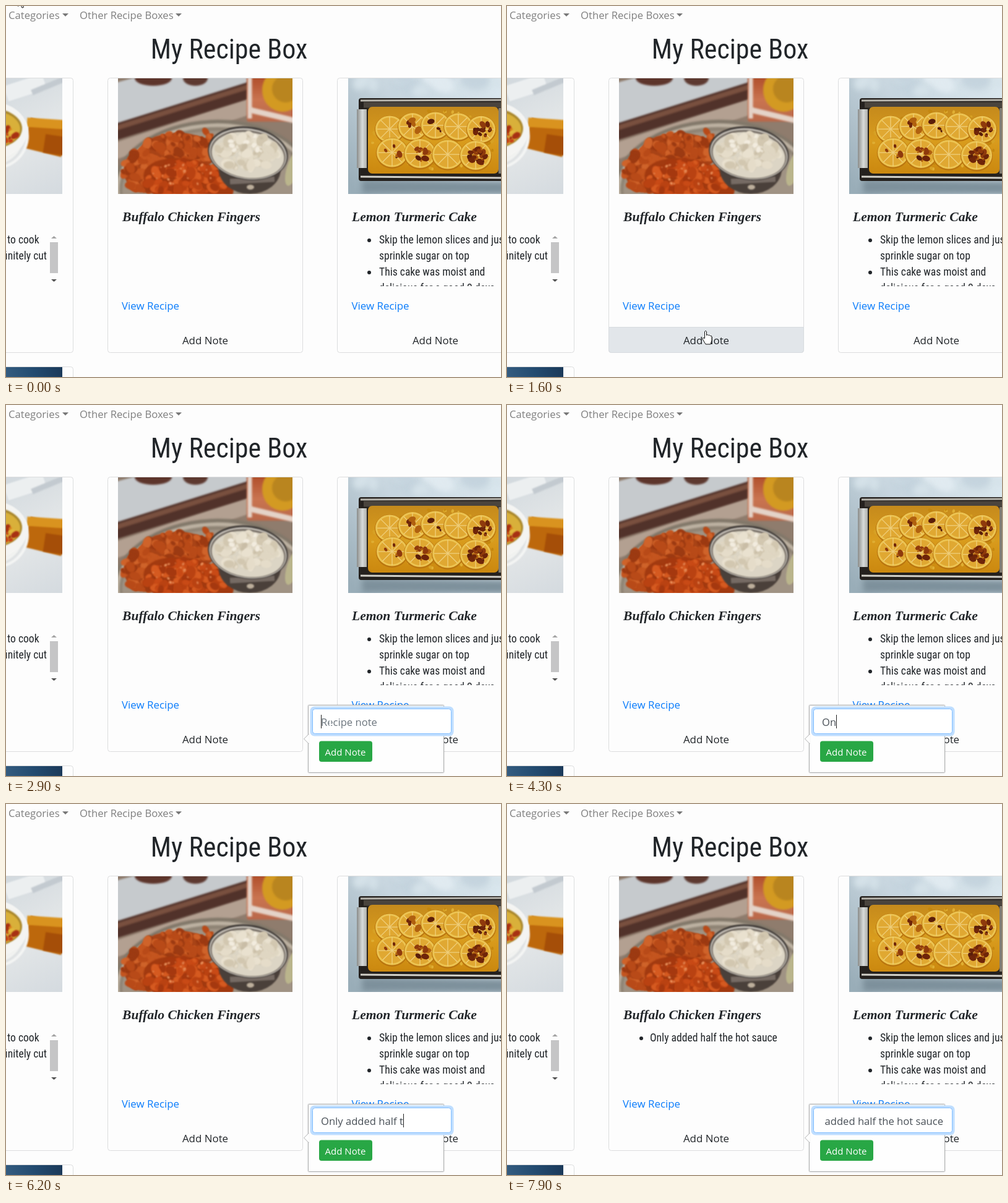
Write an HTML page with a canvas that moves like this. It is 800 by 600 pixels and loops after 8000 ms.

```html
<!DOCTYPE html>
<html lang="en">
<head>
<meta charset="utf-8">
<title>My Recipe Box</title>
<style>
html, body { margin: 0; width: 100%; height: 100%; overflow: hidden; background: #fdfdfd; }
canvas { display: block; }
</style>
</head>
<body>
<canvas id="stage" width="800" height="600"></canvas>
<script>
const stage = document.getElementById('stage');
const LOOP = 8000;
const INK = '#212529', LINK = '#0a7cfb', PAGE = '#fdfdfd', EDGE = '#dcddde';
const SANS = '"Open Sans", "Noto Sans", sans-serif';
const NARROW = '"Roboto Condensed", Roboto, sans-serif';
const SCRIPT = 'Pacifico, "Liberation Serif", serif';
const NOTE = 'Only added half the hot sauce';
let c;

// ---- text and shape helpers ----
function text(s, x, y, font, color, align = 'left') {
  c.font = font;
  c.fillStyle = color;
  c.textAlign = align;
  c.fillText(s, x, y);
}
const sans = (s, x, y, color, align, size = 16.9) => text(s, x, y, `${size}px ${SANS}`, color, align);
const script = (s, x) => text(s, x, 348, `italic bold 21.6px ${SCRIPT}`, INK);
function narrow(s, x, y, size = 17.6, align) {
  c.fontStretch = 'condensed';
  text(s, x, y, `${size}px ${NARROW}`, INK, align);
  c.fontStretch = 'normal';
}
function rect(color, x, y, w, h) {
  c.fillStyle = color;
  c.fillRect(x, y, w, h);
}
function oval(color, x, y, rx, ry = rx, turn = 0) {
  c.fillStyle = color;
  c.beginPath();
  c.ellipse(x, y, rx, ry, turn, 0, 7);
  c.fill();
}
function line(color, width, x0, y0, x1, y1) {
  c.strokeStyle = color;
  c.lineWidth = width;
  c.beginPath();
  c.moveTo(x0, y0);
  c.lineTo(x1, y1);
  c.stroke();
}
function box(x, y, w, h, r, fill, edge) {
  c.beginPath();
  c.roundRect(x, y, w, h, r);
  if (fill) { c.fillStyle = fill; c.fill(); }
  if (edge) { c.strokeStyle = edge; c.lineWidth = 1; c.stroke(); }
}
function triangle(color, x, y, half, h) {
  c.fillStyle = color;
  c.beginPath();
  c.moveTo(x - half, y);
  c.lineTo(x + half, y);
  c.lineTo(x, y + h);
  c.fill();
}
function clipped(x, y, w, h, draw) {
  c.save();
  c.beginPath();
  c.rect(x, y, w, h);
  c.clip();
  draw();
  c.restore();
}
function fade(x0, y0, x1, y1, ...colors) {
  const g = c.createLinearGradient(x0, y0, x1, y1);
  colors.forEach((k, i) => g.addColorStop(i / (colors.length - 1), k));
  return g;
}
function seeded(seed) {
  return () => (seed = (seed * 16807) % 2147483647) / 2147483647;
}
// random blobs inside an ellipse
function scatter(n, x, y, rx, ry, size, ...colors) {
  const rnd = seeded(Math.round(x * 31 + y + n));
  for (let i = 0; i < n; i++) {
    const a = rnd() * 6.283, d = Math.sqrt(rnd()), s = size * (0.4 + rnd());
    oval(colors[Math.floor(rnd() * colors.length)],
      x + Math.cos(a) * d * rx, y + Math.sin(a) * d * ry, s, s * 0.7, rnd() * 3);
  }
}
// nested ellipses, each a little smaller than the last
function rings(x, y, rx, ry, step, turn, ...colors) {
  colors.forEach((k, i) => oval(k, x, y + i, rx - i * step, ry - i * step, turn));
}

// ---- pictures ----
function chicken() {
  rect('#8f7c6d', 181, 117, 282, 187);
  c.filter = 'blur(1.5px)';
  line('#c6cacd', 70, 160, 165, 400, 100);
  oval('#5d352b', 238, 117, 30, 12);
  oval('#5d3930', 306, 117, 20, 12);
  line('#b3a091', 26, 176, 235, 400, 160);
  line('#51322a', 26, 176, 204, 400, 134);
  line('#79503f', 8, 176, 198, 400, 128);
  rings(335, 290, 162, 106, 5, -0.05, '#82786a', '#bdb2a2', '#8f8475', '#a09384');
  box(389, 105, 80, 82, 4, fade(0, 117, 0, 187, '#b1502c', '#c97450', '#b9684a'));
  line('#e4d3c8', 7, 394, 112, 394, 182);
  line('#e4d3c8', 9, 394, 168, 470, 186);
  oval('#d39a22', 447, 136, 33, 35);
  oval('#b9851f', 452, 134, 22, 22);

  c.filter = 'blur(1px)';
  const crisp = ['#c4551f', '#b84a18', '#cf632a', '#9c3a12'];
  oval('#a84317', 277, 238, 62, 33);
  scatter(130, 274, 236, 56, 30, 8, ...crisp);
  oval('#a84317', 226, 266, 36, 35);
  scatter(90, 224, 268, 36, 32, 8, ...crisp);
  scatter(16, 322, 214, 14, 12, 6, ...crisp);
  oval('#a23a10', 295, 286, 74, 38, 0.2);
  scatter(130, 294, 282, 66, 30, 8, '#c84a16', '#b94212', '#d55a20', '#a5380f');
  scatter(24, 292, 272, 55, 18, 2, '#e8935f', '#e08350');

  oval('#4a403a', 394, 264, 50, 40);
  line('#766b64', 9, 362, 284, 434, 280);
  rings(391, 238, 65, 43, 2, 0.14, '#3a3532', '#c9c4bc', '#6f675f', '#dcd5c5');
  scatter(90, 389, 236, 48, 28, 8, '#e9e1cf', '#dfd6c2', '#e5dcc9', '#d2c7b0');
  scatter(14, 388, 224, 34, 16, 4, '#f2ecdf', '#c9bda6');
  oval('#bdaf9c', 395, 293, 6, 4);
  oval('#bab58c', 464, 262, 10, 30, 0.3);
  c.filter = 'none';
}

function lemon(x, y, r, burn) {
  oval('#b9750f', x, y + 1, r + 1, r);
  oval('#ecc452', x, y, r, r * 0.94);
  oval('#e0a832', x, y, r - 3, r * 0.94 - 3);
  for (let a = x % 1; a < 6.2; a += 0.785) {
    line('#efcf7d', 1.3, x, y, x + Math.cos(a) * (r - 3), y + Math.sin(a) * (r - 3));
  }
  scatter(burn, x + 2, y, r * 0.6, r * 0.5, 5, '#6f2509', '#8f3a0c', '#5a1e0a', '#b0600f');
}

function cake() {
  rect(fade(790, 117, 570, 304, '#dbe8ef', '#c8d6df', '#99adb8'), 553, 117, 247, 187);
  c.filter = 'blur(5px)';
  scatter(20, 680, 123, 130, 18, 18, '#e0eaf0', '#c5d4de', '#d4e1e8');
  line('#7d909b', 22, 575, 292, 810, 294);
  c.filter = 'blur(0.7px)';
  box(570, 149, 240, 134, 4, '#25211e');
  line('#b9b6ae', 3, 573, 153, 810, 152);
  line('#4a443d', 9, 578, 160, 810, 160);
  rect(fade(567, 0, 585, 0, '#8a8c8a', '#d8dbda', '#a0a09b'), 567, 167, 16, 95);
  line('#d3d1c9', 3, 573, 276, 810, 278);
  rect('#817d72', 796, 165, 4, 106);
  box(585, 163, 211, 108, 7, fade(0, 163, 0, 271, '#c58a1c', '#d99c1d', '#cb880f'));
  scatter(150, 690, 217, 102, 50, 3, '#d6a024', '#c4870f', '#dfae33');
  for (let i = 0; i < 5; i++) lemon(620 + i * 37, 199 - 6 * Math.sin(i * 0.8), 23, [0, 6, 3, 0, 14][i]);
  for (let i = 0; i < 4; i++) lemon(624 + i * 45, 237 + i * 1.5, 25, [5, 14, 0, 22][i]);
  c.filter = 'none';
}

function soup() {
  rect(fade(0, 117, 91, 304, '#d2d9de', '#e4e7e8', '#d4dadf'), 0, 117, 91, 187);
  c.filter = 'blur(1.2px)';
  line('#eceff0', 26, 0, 142, 62, 122);
  line('#c3cad0', 9, 42, 140, 95, 118);
  line('#bd680c', 50, 34, 205, 95, 220);
  line('#d9931f', 15, 34, 188, 95, 192);
  line('#a54e08', 30, 62, 222, 95, 227);
  rings(-19, 210, 56, 54, 5, 0.1, '#f4f5f4', '#dfe2e3', '#f1f2f0');
  oval('#f4f4f2', -25, 202, 60, 46);
  rings(-26, 198, 52, 33, 3, 0, '#a8862c', '#d9b03a');
  scatter(16, 5, 208, 13, 11, 5, '#c43f16', '#dc851d', '#a73113', '#e2b83d');
  c.filter = 'none';
}

// ---- the page ----
function page() {
  rect(PAGE, 0, 0, 800, 600);
  sans('Categories', 4, 21, '#7f7f7f', 'left', 16.7);
  sans('Other Recipe Boxes', 119, 21, '#7f7f7f', 'left', 16.7);
  for (const x of [96, 279]) triangle('#777', x, 12, 5, 5);
  narrow('My Recipe Box', 360.5, 85, 44, 'center');

  for (const x of [-207, 164, 535]) box(x + 0.5, 116.5, 315, 444, 4, PAGE, EDGE);
  clipped(0, 117, 91, 187, soup);
  clipped(181, 117, 282, 187, chicken);
  clipped(553, 117, 247, 187, cake);
  box(-206.5, 583.5, 315, 60, 4, PAGE, EDGE);
  rect(fade(0, 600, 91, 584, '#345c80', '#234b70', '#1b3959'), 0, 584, 91, 16);

  narrow('to cook', 2, 384);
  narrow('definitely cut', 66, 410, 17.6, 'right');
  rect('#c5c5c6', 71, 382, 13, 50);
  triangle('#a3a3a3', 77.5, 376, 4.5, -4);
  triangle('#505050', 77.5, 442, 4.5, 4);

  script('Buffalo Chicken Fingers', 188);
  script('Lemon Turmeric Cake', 559);
  clipped(553, 360, 247, 93, () => {
    ['Skip the lemon slices and just', 'sprinkle sugar on top', 'This cake was moist and', 'delicious for a good 2 days']
      .forEach((s, i) => {
        narrow(s, 603, 384 + i * 26);
        if (i % 2 === 0) oval(INK, 587, 379 + i * 26, 3);
      });
  });
  for (const x of [187, 558.5]) sans('View Recipe', x, 491, LINK);
  sans('Add Note', 694, 547, INK, 'center');
}

function noteButton(t) {
  const hover = t >= 1600 && t < 2500;
  const ring = t >= 1900 && t < 2900;
  if (ring) box(162.5, 516.5, 319, 46, 5, 'rgba(200,205,212,0.55)');
  if (hover) box(164.5, 519.5, 315, 41, [0, 0, 4, 4], '#e2e6ea', '#d7dbdf');
  else if (ring) box(165, 519, 314, 41, [0, 0, 4, 4], '#f8f9fa');
  sans('Add Note', 322, 547, INK, 'center');
}

// ---- typing ----
// [time, letters] at each change of pace
const PACE = [[4000, 0], [4100, 1], [4500, 3], [5000, 8], [5400, 10], [5600, 13], [5900, 14],
  [6700, 23], [6800, 26], [7200, 26], [7300, 28], [7400, 29]];
const span = (t, a, b) => Math.min(1, Math.max(0, (t - a) / (b - a)));
function typed(t) {
  let n = 0;
  for (let i = 1; i < PACE.length; i++) {
    const [a, from] = PACE[i - 1], [b, to] = PACE[i];
    n += (to - from) * span(t, a, b);
  }
  return Math.floor(n + 1e-6);
}
const caretOn = t => t < 7900 && !(t >= 3500 && t < 3900);

function field(t) {
  const focus = t >= 2900;
  if (focus) box(491.5, 487.5, 232, 48, 7, '#bfdeff');
  box(495.5, 491.5, 224, 40, 4, '#fff', focus ? '#80bdff' : '#ced4da');
  const s = NOTE.slice(0, typed(t));
  c.font = `16.6px ${SANS}`;
  const w = c.measureText(s).width, x = 509 - Math.max(0, w - 196);
  clipped(509, 494, 197.5, 35, () => {
    sans(s || 'Recipe note', x, 519, s ? '#495057' : '#6c757d', 'left', 16.6);
    if (focus && caretOn(t)) rect('#222', Math.round(x + w), 501, 1, 22);
  });
}

function popover(t) {
  c.globalAlpha = t < 2000 ? 0.55 : 1;
  c.shadowColor = 'rgba(0,0,0,0.12)';
  c.shadowBlur = 3;
  box(488.5, 485.5, 219, 109, 1, '#fefefe', '#b0b1b2');
  c.shadowColor = 'transparent';
  c.beginPath();
  c.moveTo(489.5, 532);
  c.lineTo(481.5, 540);
  c.lineTo(489.5, 548);
  c.fill();
  c.stroke();
  field(t);
  box(506, 543.5, 86, 33.5, 4, '#28a745');
  sans('Add Note', 548.5, 567, '#fff', 'center', 15);
  c.globalAlpha = 1;
}

// ---- pointer ----
const ARROW = new Path2D('M0 0V16L4 12.5L6.5 18.5L9 17.5L6.5 11.5H11Z');
const HAND = new Path2D('M-1 13V2Q.5-.5 2 2V8Q4 6 5 8Q7 7 8 9Q10.5 8 10.5 11V16L8.5 22.5H.5L-4.5 14Q-4.5 11-1 13Z');
function cursor(shape, x, y) {
  c.save();
  c.translate(x + 0.5, y + 0.5);
  c.fillStyle = '#fff';
  c.fill(shape);
  c.strokeStyle = '#111';
  c.lineWidth = 1;
  c.stroke(shape);
  c.restore();
}
function glide(t, a, b, from, to) {
  const p = span(t, a, b), e = p * p * (3 - 2 * p);
  return from.map((v, i) => v + (to[i] - v) * e);
}
function pointer(t) {
  if (t < 1600) return cursor(ARROW, ...glide(t, 600, 1500, [19, -16], [318, 500]));
  if (t < 2000) return cursor(HAND, ...glide(t, 1600, 1700, [320, 524], [323, 533]));
  if (t >= 4100) return;
  const [x, y] = glide(t, 2100, 2700, [323, 533], [524, 513]);
  if (x < 495) cursor(ARROW, x, y);
  else rect('#fff', x - 1, y - 8, 2, 16);
}

// the unchanging page is painted once
const base = document.createElement('canvas');
base.width = 800;
base.height = 600;
c = base.getContext('2d');
page();
c = stage.getContext('2d');

function frame(now) {
  const t = Math.floor((now % LOOP) / 100) * 100;
  c.drawImage(base, 0, 0);
  noteButton(t);
  if (t >= 7800) {
    oval(INK, 217, 379, 3);
    narrow(NOTE, 231, 384);
  }
  if (t >= 1900) popover(t);
  pointer(t);
  requestAnimationFrame(frame);
}
requestAnimationFrame(frame);
</script>
</body>
</html>
```
